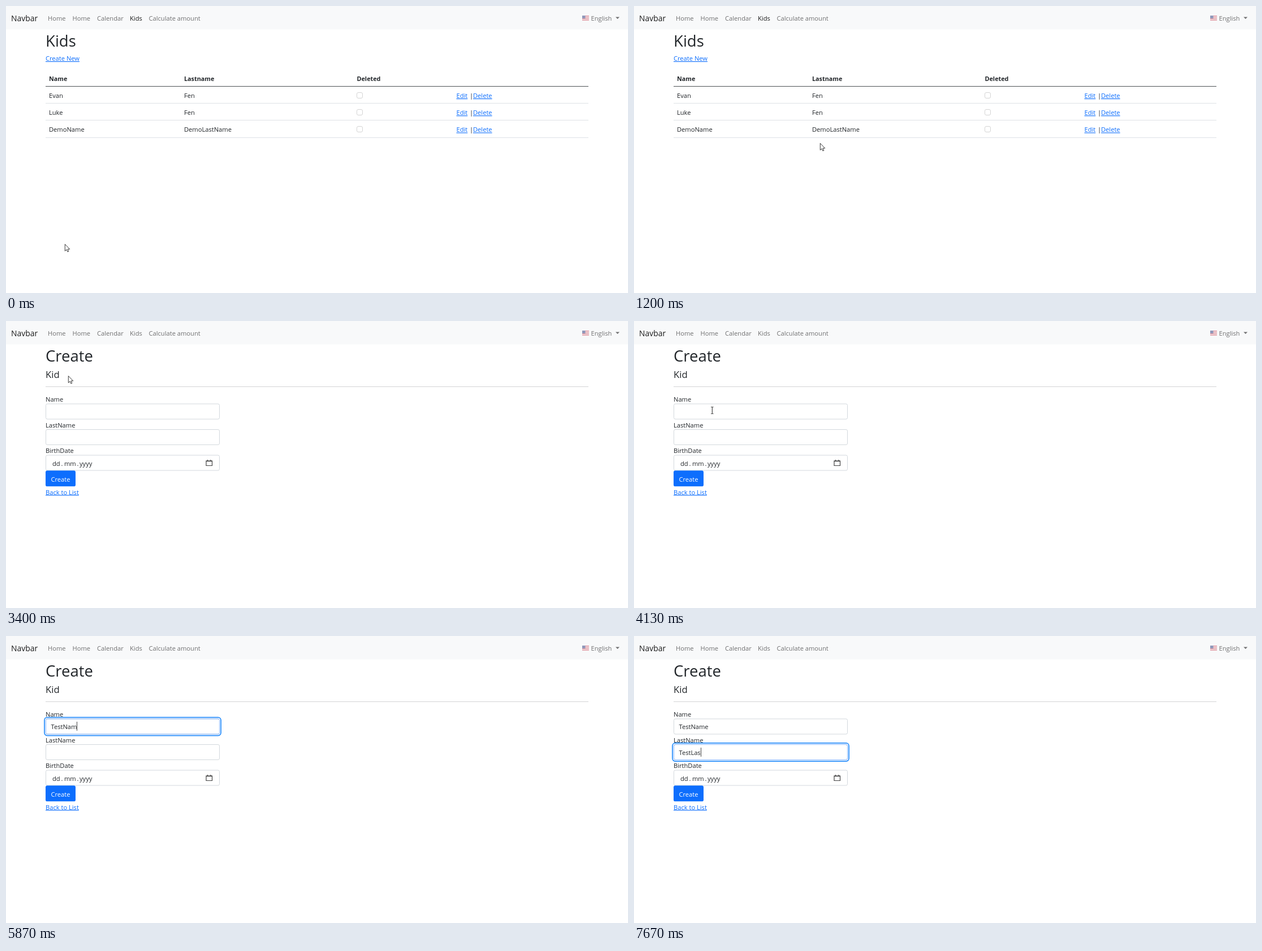
An HTML page that plays this animation: 1100x509 px, repeating every 8 s.

```html
<!DOCTYPE html>
<html lang="en">
<head>
<meta charset="utf-8">
<title>Kids</title>
<style>
  html, body { margin: 0; width: 100%; height: 100%; overflow: hidden; background: #fff; }
  svg { display: block; width: 1100px; height: 509px; font: 11.15px "Open Sans", "Noto Sans", sans-serif; fill: #212529; }
  text { white-space: pre; }
  .h1 { font-size: 27.5px; }
  .h4 { font-size: 16.7px; }
  .brand { font-size: 13.9px; fill: #191919; }
  .nav { fill: #707071; }
  .active { fill: #191919; }
  .bold { font-size: 10.8px; font-weight: 700; }
  .link { fill: #0d6efd; text-decoration: underline; }
  .link.hover { fill: #0a58ca; }
  .white { fill: #fff; }
  .box { fill: #fff; stroke: #d3d8dd; }
  .pointer { fill: #fff; stroke: #222; stroke-width: .9; stroke-linejoin: round; }
</style>
</head>
<body>
<svg id="stage" viewBox="0 0 1100 509"></svg>
<script>
const TICKS = 120, TICKS_PER_MS = 0.015;
const OPEN_FORM = 51, FOCUS_NAME = 64, FIRST_KEY = 67, FOCUS_LAST = 93;

// [tick, x, y] of the pointer tip
const path = [
  [0, 104, 422], [1, 110, 402], [3, 138, 325], [5, 157, 266], [7, 157, 266],
  [9, 187, 221], [11, 222, 181], [15, 222, 181], [16, 250, 205], [17, 293, 232],
  [18, 329, 243], [19, 355, 235], [20, 368, 215], [22, 320, 180], [24, 220, 130],
  [26, 125, 101], [27, 110, 97], [55, 110, 97], [57, 117, 116], [60, 136, 154], [61, 138, 158]
];

const text = (x, y, s, cls = '', id = '') =>
  `<text x="${x}" y="${y}" class="${cls}" id="${id}">${s}</text>`;
const line = (y, color) =>
  `<rect x="70" y="${y}" width="960" height="1" fill="${color}"/>`;
const box = y =>
  `<rect class="box" x="70.5" y="${y + .5}" width="307" height="27" rx="2.6"/>`;

const navbar = `<rect width="1100" height="41.5" fill="#f8f9fa"/>`
  + text(9, 27, 'Navbar', 'brand')
  + [[74, 'Home'], [117.5, 'Home'], [161, 'Calendar'], [219, 'Kids', 'kidsTab'], [252.5, 'Calculate amount']]
      .map(([x, s, id]) => text(x, 26, s, 'nav', id)).join('')
  + `<g opacity=".55"><rect x="1019" y="17" width="12" height="9" fill="#eee"/>
     <path d="M1019 17.7h12m-12 2.5h12m-12 2.5h12m-12 2.5h12" stroke="#d0384a" stroke-width="1.3"/>
     <rect x="1019" y="17" width="5.5" height="5" fill="#3c4a86"/></g>`
  + text(1034.5, 26, 'English', 'nav')
  + `<path d="M1078 19.5h7l-3.5 3.5z" fill="#707071"/>`;

const row = ([first, last], i) => {
  const y = 163 + 30.2 * i;
  return text(76, y, first) + text(315, y, last)
    + `<rect x="620.5" y="${Math.round(y) - 9.5}" width="10" height="10" rx="2.5" fill="#fff" stroke="#d4d4d4"/>`
    + text(796.5, y, 'Edit', 'link') + text(820, y, '|') + text(826, y, 'Delete', 'link')
    + line(Math.round(172 + 30.4 * i), '#dee2e6');
};

const list = text(70, 72, 'Kids', 'h1') + text(70, 97, 'Create New', 'link', 'createNew')
  + text(76, 132.8, 'Name', 'bold') + text(315, 132.8, 'Lastname', 'bold') + text(620.5, 132.8, 'Deleted', 'bold')
  + line(142, '#4d5154')
  + [['Evan', 'Fen'], ['Luke', 'Fen'], ['DemoName', 'DemoLastName']].map(row).join('');

const form = text(70, 72, 'Create', 'h1') + text(70, 101, 'Kid', 'h4') + line(116, '#d3d4d5')
  + text(70, 143, 'Name') + text(70, 188.5, 'LastName') + text(70, 234, 'BirthDate')
  + box(237.5)
  + [[82, 'dd'], [97.5, '.'], [103, 'mm'], [125.5, '.'], [130, 'yyyy']].map(([x, s]) => text(x, 256.5, s)).join('')
  + `<path d="M354 248h10.5v8.5h-10.5zM354 248.6h10.5M356.5 246v2M362 246v2" fill="none" stroke="#444" stroke-width="1.2"/>`
  + `<rect x="70" y="265.3" width="53" height="28" rx="2.9" fill="#0d6efd"/>`
  + text(79.5, 284.5, 'Create', 'white') + text(70, 307.5, 'Back to List', 'link');

stage.innerHTML = navbar + `<g id="list">${list}</g><g id="form">${form}<g id="fields"></g></g>`
  + `<g id="pointer">
  <path id="arrow" class="pointer" d="M0 0V12L2.8 9.5 4.6 13.5 6.5 12.7 4.8 8.7H8.4Z"/>
  <path id="hand" class="pointer" d="M.5 9V1.3a1.2 1.2 0 0 1 2.4 0V6.3c.2-1 2-1 2.3.2c.4-.8 2-.7 2.2.5c.6-.6 1.8-.3 1.8.9V12c0 2-1.4 3-1.6 5H1.5C1 14.5-1.5 13-3 10c-.6-1.3 1-2.2 2-1.2z"/>
  <path id="beam" d="M-2 -6h1.5l.5 .5 .5 -.5h1.5M0 -5.5v11M-2 6h1.5l.5 -.5 .5 .5h1.5" fill="none" stroke="#222"/></g>`;

const $ = id => document.getElementById(id);
const show = (id, on) => $(id).setAttribute('display', on ? 'inline' : 'none');
const clamp = v => Math.max(0, Math.min(1, v));

const inputs = [
  { y: 146.5, value: 'TestName', keys: [67, 70, 71, 73, 84, 86, 88, 90], focus: FOCUS_NAME, blur: FOCUS_LAST },
  { y: 192, value: 'TestLas', keys: [98, 101, 103, 104, 109, 111, 115], focus: FOCUS_LAST, blur: TICKS }
];

function drawInput(input, i, tick) {
  const glow = clamp((tick - input.focus + .4) / 1.4) - clamp((tick - input.blur + .4) / 1.4);
  const ring = (spread, color) =>
    `<rect x="${70 - spread}" y="${input.y - spread}" width="${308 + 2 * spread}" height="${28 + 2 * spread}"
      rx="${2.9 + spread}" fill="${color}" opacity="${glow}"/>`;
  const typed = input.value.slice(0, input.keys.filter(k => k <= tick).length);
  return (glow > 0 ? ring(2.9 * glow, '#258cfb') + ring(1.16 * glow, '#fff') : '') + box(input.y)
    + (glow > 0 ? `<rect x="70.5" y="${input.y + .5}" width="307" height="27" rx="2.6" fill="none" stroke="#86b7fe" opacity="${glow}"/>` : '')
    + text(79.5, input.y + 18.6, typed, '', 'value' + i);
}

function drawCaret(tick) {
  const i = tick >= FOCUS_LAST ? 1 : 0, input = inputs[i];
  const last = Math.max(input.focus, ...input.keys.filter(k => k <= tick));
  if (tick < input.focus || (tick - last) % 16 >= 8) return;
  const x = Math.round(79.5 + $('value' + i).getComputedTextLength());
  $('fields').insertAdjacentHTML('beforeend',
    `<rect x="${x}" y="${Math.round(input.y + 5.7)}" width="1" height="16" fill="#444"/>`);
}

function pointerAt(tick) {
  const next = path.findIndex(p => p[0] > tick);
  if (next < 0) return path[path.length - 1].slice(1);
  const [t0, x0, y0] = path[next - 1], [t1, x1, y1] = path[next];
  const f = (tick - t0) / (t1 - t0);
  return [x0 + (x1 - x0) * f, y0 + (y1 - y0) * f];
}

function draw(now) {
  const tick = Math.floor(now * TICKS_PER_MS + .1) % TICKS;
  const onForm = tick >= OPEN_FORM, hover = tick >= 27 && !onForm;
  const [x, y] = pointerAt(tick), overInput = onForm && y > 146;

  show('list', !onForm);
  show('form', onForm);
  $('kidsTab').setAttribute('class', onForm ? 'nav' : 'active');
  $('createNew').setAttribute('class', hover ? 'link hover' : 'link');
  $('fields').innerHTML = inputs.map((input, i) => drawInput(input, i, tick)).join('');
  if (onForm) drawCaret(tick);

  show('pointer', tick < FIRST_KEY);
  show('arrow', !hover && !overInput);
  show('hand', hover);
  show('beam', overInput);
  $('pointer').setAttribute('transform', `translate(${Math.round(x) + .3} ${Math.round(y) + .5})`);
}

const start = performance.now();
(function loop() {
  draw(performance.now() - start);
  requestAnimationFrame(loop);
})();
</script>
</body>
</html>
```
